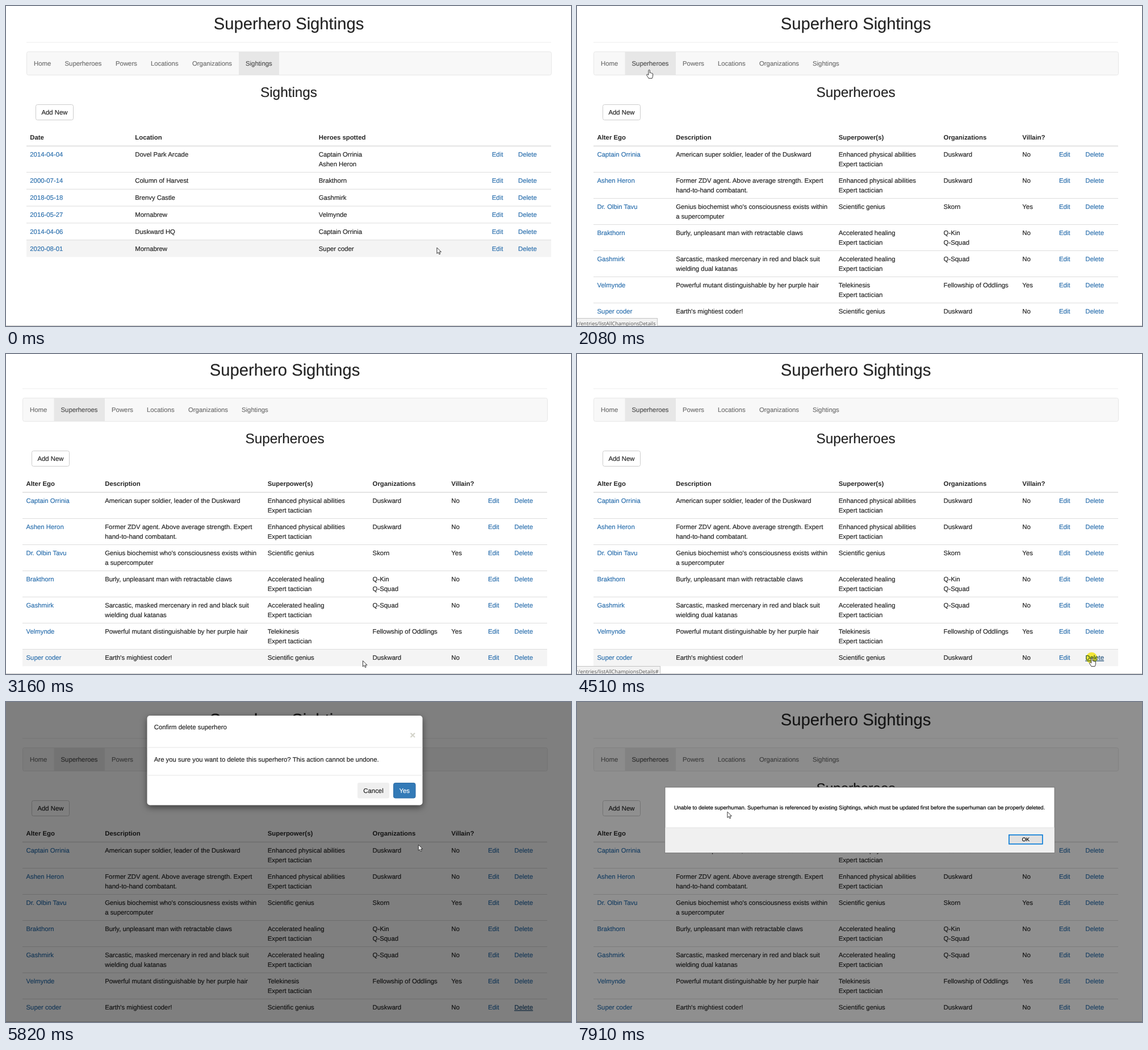
An HTML page that plays this animation: 995 by 563 pixels, repeating every 7.99 s.

```html
<!DOCTYPE html>
<html lang="en">
<head>
<meta charset="utf-8">
<title>Superhero Sightings</title>
<style>
html, body { margin: 0; width: 100%; height: 100%; overflow: hidden; background: #fff; }
svg { display: block; width: 995px; height: 563px; overflow: hidden; }
text {
  font: 11.35px "Liberation Sans", Arial, sans-serif; text-rendering: geometricPrecision;
  color: #242424; fill: currentColor; stroke: currentColor; stroke-width: .18px;
}
.title { font-size: 29.2px; text-anchor: middle; }
.heading { font-size: 24.3px; text-anchor: middle; }
.bold { font-weight: bold; stroke: none; }
.link { color: #2c70ae; }
.nav { color: #707070; }
.nav.active { color: #505050; }
.nav.hover { color: #333; }
.focus { color: #23527c; text-decoration: underline; }
.middle { text-anchor: middle; }
.white { color: #fff; }
.alert { font-size: 9.45px; color: #000; }
.status { font: 9.1px "Open Sans", "Noto Sans", sans-serif; color: #555; stroke: none; text-anchor: end; }
.close { font-size: 17px; font-weight: bold; color: #d2d2c8; text-anchor: middle; }
#click { mix-blend-mode: multiply; }
</style>
</head>
<body>
<svg id="stage" viewBox="0 0 995 563"></svg>
<script>
const LOOP = 7990;
const LINE = 16.2;
const NAV = [['Home', 49, 37], ['Superheroes', 103.5, 91.5], ['Powers', 193, 181], ['Locations', 255, 243],
  ['Organizations', 328, 316], ['Sightings', 422, 410], ['', 0, 481]];

const text = (x, y, str, cls = '', id = '') => `<text x="${x}" y="${y}" class="${cls}" id="${id}">${str}</text>`;
const rect = (x, y, w, h, fill, more = '') => `<rect x="${x}" y="${y}" width="${w}" height="${h}" fill="${fill}" ${more}/>`;

// Lays out one page; cells hold their lines separated by "|".
function buildPage({ id, dx, active, columns, head, rows }) {
  const left = 36 + dx, mid = 498 + dx;
  const nav = NAV.slice(0, -1).map(([name, x, start], i) => {
    const on = name === active;
    return (on ? rect(start + dx, 81, NAV[i + 1][2] - start, 41, '#e7e7e7') : '') +
      text(x + dx, 105, name, on ? 'nav active' : 'nav');
  }).join('');
  let top = 246.5, table = '';
  const tops = [top];
  rows.forEach((cells, r) => {
    if (r) table += rect(left, top - .5, 924, 1, '#ddd');
    const last = cells.length - 1;
    cells.concat('Edit', 'Delete').forEach((cell, c) => {
      const cls = c === 0 || c > last ? 'link' : '';
      const name = c === last + 2 && r === rows.length - 1 ? id + 'Delete' : '';
      cell.split('|').forEach((line, i) => { table += text(columns[c], top + 18.8 + i * LINE, line, cls, name); });
    });
    top += cells.some(c => c.includes('|')) || id === 'heroes' && r < rows.length - 1 ? 46 : 29.8;
    tops.push(top);
  });
  const html = `<g id="${id}">` +
    text(mid, 41, 'Superhero Sightings', 'title') + rect(left, 63.5, 924, 1, '#eee') +
    rect(left + .5, 80.5, 924, 41, '#f8f8f8', 'stroke="#e7e7e7" rx="3"') + nav +
    text(mid, 160, active, 'heading') +
    rect(left + 16.5, 173.5, 66, 27, '#fff', 'stroke="#ccc" rx="3"') + text(left + 49.5, 190.7, 'Add New', 'middle') +
    rect(left, 0, 924, 0, '#f4f4f4', `id="${id}Hover"`) +
    head.map((h, i) => text(columns[i], 234.8, h, 'bold')).join('') +
    rect(left, 245.6, 924, 1.6, '#ddd') + table + '</g>';
  return { html, tops };
}

const sightings = buildPage({
  id: 'sightings', dx: 0, active: 'Sightings',
  columns: [42.3, 227.3, 550.8, 855.8, 902],
  head: ['Date', 'Location', 'Heroes spotted'],
  rows: [
    ['2014-04-04', 'Dovel Park Arcade', 'Captain Orrinia|Ashen Heron'],
    ['2000-07-14', 'Column of Harvest', 'Brakthorn'],
    ['2018-05-18', 'Brenvy Castle', 'Gashmirk'],
    ['2016-05-27', 'Mornabrew', 'Velmynde'],
    ['2014-04-06', 'Duskward HQ', 'Captain Orrinia'],
    ['2020-08-01', 'Mornabrew', 'Super coder']
  ]
});
const heroes = buildPage({
  id: 'heroes', dx: -7, active: 'Superheroes',
  columns: [35.5, 174.2, 460.8, 645.6, 784.3, 848.9, 895.2],
  head: ['Alter Ego', 'Description', 'Superpower(s)', 'Organizations', 'Villain?'],
  rows: [
    ['Captain Orrinia', 'American super soldier, leader of the Duskward', 'Enhanced physical abilities|Expert tactician', 'Duskward', 'No'],
    ['Ashen Heron', 'Former ZDV agent. Above average strength. Expert|hand-to-hand combatant.', 'Enhanced physical abilities|Expert tactician', 'Duskward', 'No'],
    ['Dr. Olbin Tavu', "Genius biochemist who's consciousness exists within|a supercomputer", 'Scientific genius', 'Skorn', 'Yes'],
    ['Brakthorn', 'Burly, unpleasant man with retractable claws', 'Accelerated healing|Expert tactician', 'Q-Kin|Q-Squad', 'No'],
    ['Gashmirk', 'Sarcastic, masked mercenary in red and black suit|wielding dual katanas', 'Accelerated healing|Expert tactician', 'Q-Squad', 'No'],
    ['Velmynde', 'Powerful mutant distinguishable by her purple hair', 'Telekinesis|Expert tactician', 'Fellowship of Oddlings', 'Yes'],
    ['Super coder', "Earth's mightiest coder!", 'Scientific genius', 'Duskward', 'No']
  ]
});

const modal = '<g id="modal">' +
  rect(248.5, 24, 485, 157.5, '#fff', 'rx="5" style="filter:drop-shadow(0 4px 6px rgba(0,0,0,.5))"') +
  text(260.8, 47.8, 'Confirm delete superhero') + text(716.3, 64, '×', 'close') +
  rect(248.5, 79.5, 485, 1, '#e5e5e5') + rect(248.5, 128.5, 485, 1, '#e5e5e5') +
  text(260.8, 104.8, 'Are you sure you want to delete this superhero? This action cannot be undone.') +
  rect(619, 142, 56, 27.5, '#efefef', 'rx="3"') + text(647, 159.7, 'Cancel', 'middle') +
  rect(682.5, 142.5, 38.5, 26.5, '#337ab7', 'id="yes" stroke="#2e6da4" rx="3"') +
  text(701.8, 159.7, 'Yes', 'middle white') + '</g>';

const alertBox = '<g id="alert">' +
  rect(155, 150, 686, 115.5, '#fff', 'stroke="#666" stroke-width=".8"') +
  rect(155.4, 221, 685.2, 44, '#f0f0f0') + rect(155.4, 220.7, 685.2, .8, '#dfdfdf') +
  text(171, 188.5, 'Unable to delete superhuman. Superhuman is referenced by existing Sightings, which must be updated first before the superhuman can be properly deleted.', 'alert') +
  rect(760.8, 233.8, 59, 16, '#e1e1e1', 'stroke="#0078d7" stroke-width="1.6"') +
  text(790.2, 245.4, 'OK', 'alert middle') + '</g>';

const status = '<g id="status">' + rect(-5, 549.5, 0, 20, '#f2f2f2', 'id="statusBox" stroke="#c4c4c4"') +
  text(0, 561.5, '', 'status', 'statusText') + '</g>';

const pointer = '<circle id="click" r="10" fill="#fff23c"/>' +
  '<g id="cursor" fill="#fff" stroke="#222" stroke-width=".9" stroke-linejoin="round">' +
  '<path id="arrow" d="M.9 .2V10.5L3.3 8.3 5 12 6.7 11.2 5.1 7.7H8.4Z"/>' +
  '<path id="hand" d="M-.6 9V1.4Q-.6 .1 .6 .1T1.8 1.4V5.4Q3 4.6 3.7 5.8 5 5.2 5.5 6.4 6.9 6 7 7.4V10.9Q6.8 12.9 5.6 15H-.4Q-1.8 12.4 -3.8 9.6C-4.4 8 -2.6 7.2 -1.7 8.4Z"/></g>';

const stage = document.getElementById('stage');
stage.innerHTML = sightings.html + heroes.html + rect(0, 562, 995, 1, '#c6c6c6') + status +
  rect(0, 0, 995, 563, '#000', 'id="shade"') + modal + alertBox + pointer;

const el = id => document.getElementById(id);
const show = (id, on) => { el(id).style.display = on ? '' : 'none'; };
const set = (id, attrs) => { for (const k in attrs) el(id).setAttribute(k, attrs[k]); };
const navLinks = [...stage.querySelectorAll('#sightings .nav')];

// Time followed by the values reached at that time.
const MOUSE = [[0, 758, 425], [240, 758, 425], [540, 480, 262], [830, 210, 112], [900, 210, 112], [1150, 126, 112],
  [2080, 126, 112], [2630, 438.5, 266], [2780, 500, 355], [2810, 500, 355], [2950, 600, 540], [3090, 600, 540],
  [3880, 906.3, 534.7], [5430, 906.3, 534.7], [5820, 725.5, 251.5], [5970, 708, 162], [7450, 708, 162], [7910, 264, 193], [LOOP, 264, 193]];
const SCROLL = [[0, 0], [2480, 0], [2630, 2], [2780, 3], [LOOP, 3]];

function track(keys, t) {
  const i = Math.max(1, keys.findIndex(k => k[0] > t));
  const a = keys[i - 1], b = keys[i], f = (t - a[0]) / (b[0] - a[0]);
  return a.slice(1).map((v, n) => v + (b[n + 1] - v) * f);
}

function hoverRow(id, tops, y) {
  const i = tops.findIndex((top, n) => y >= top && y < tops[n + 1]);
  set(id, i < 0 ? { height: 0 } : { y: tops[i], height: tops[i + 1] - tops[i] });
}

function draw(t) {
  const [x, y] = track(MOUSE, t);
  const onHeroes = t >= 1480, opening = t >= 4800, failed = t >= 6910;
  const scroll = opening ? 0 : track(SCROLL, t)[0];
  const open = Math.min(1, Math.max(0, (t - 4725) / 225));
  const overDelete = onHeroes && !opening && x >= 895 && y > 524;
  const overYes = opening && !failed && x < 721 && y < 170;
  const dx = onHeroes ? -7 : 0;
  const navIndex = y > 81 && y < 122 && !opening
    ? NAV.findIndex((n, i) => NAV[i + 1] && x >= n[2] + dx && x < NAV[i + 1][2] + dx) : -1;

  show('sightings', !onHeroes);
  show('heroes', onHeroes);
  set('heroes', { transform: `translate(0 ${-scroll})` });
  hoverRow('sightingsHover', sightings.tops, y);
  hoverRow('heroesHover', heroes.tops, opening ? -1 : y + scroll);
  navLinks.forEach((link, i) => link.classList.toggle('hover', i === navIndex));
  el('heroesDelete').classList.toggle('focus', overDelete || opening && t < 6330);

  const pageLink = t >= 1060 && t < 2230;
  show('status', pageLink || overDelete);
  set('statusBox', { width: pageLink ? 146.5 : 151.5 });
  set('statusText', { x: pageLink ? 138.5 : 143.5 });
  el('statusText').textContent = 'r/entries/listAllChampionsDetails' + (pageLink ? '' : '#');

  show('shade', opening);
  set('shade', { opacity: failed ? .44 : .5 * open });
  show('modal', opening && !failed);
  set('modal', { opacity: open, transform: `translate(0 ${-40 * (1 - open)})` });
  set('yes', { fill: overYes ? '#286090' : '#337ab7', stroke: overYes ? '#204d74' : '#2e6da4' });
  show('alert', failed);

  show('click', t >= 1410 && t < 1530 || t >= 4510 && t < 4800 || t >= 6290 && t < 6600);
  set('click', { cx: x, cy: y });
  const hand = navIndex >= 0 || overDelete || overYes;
  show('hand', hand);
  show('arrow', !hand);
  set('cursor', { transform: `translate(${x} ${y})` });
}

function tick() {
  draw(performance.now() % LOOP);
  requestAnimationFrame(tick);
}
tick();
</script>
</body>
</html>
```
